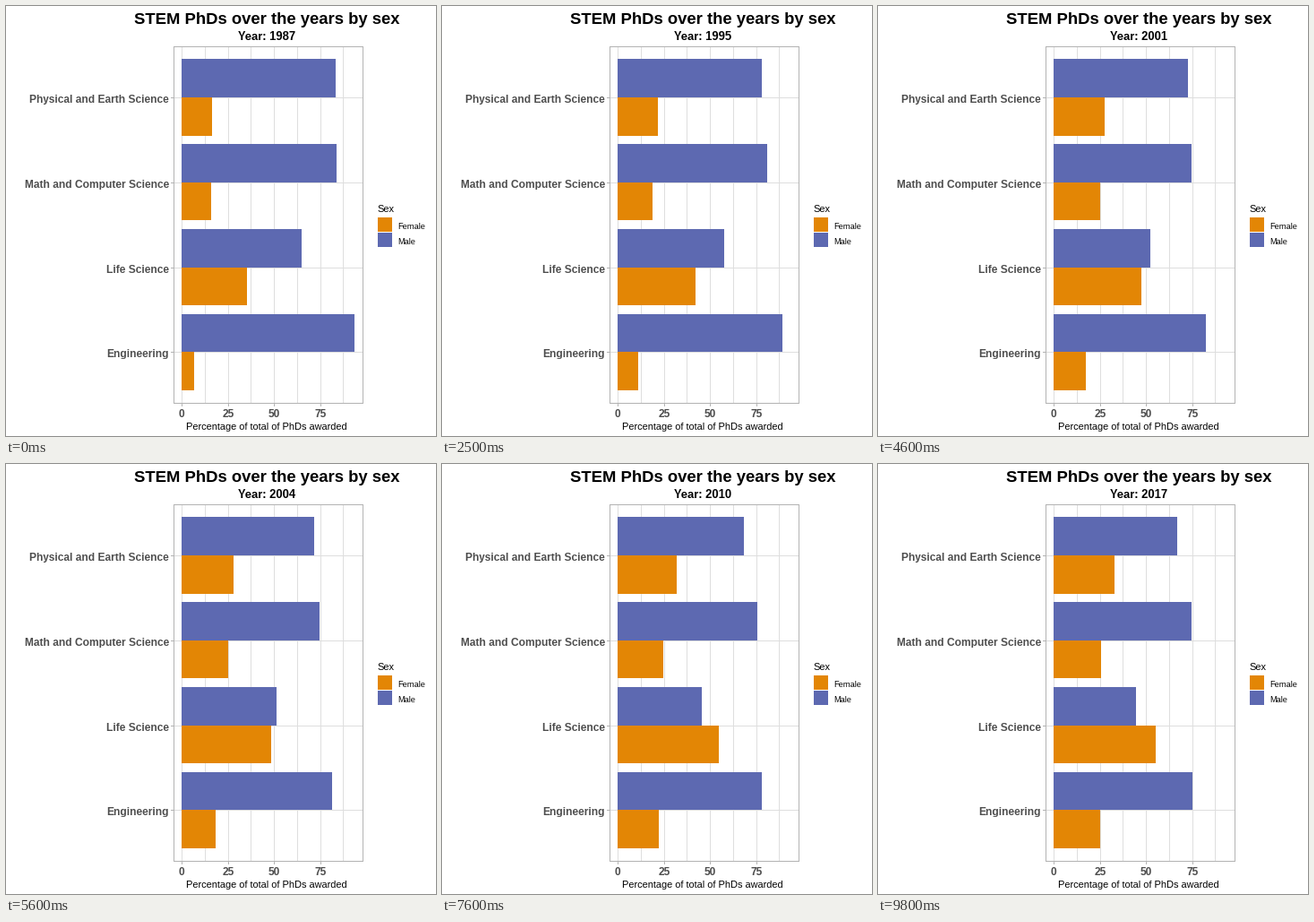
Animation of 480 by 480 pixels, one loop 10000 ms. Source, as a matplotlib script:

```python
import math

import matplotlib.pyplot as plt
from matplotlib.animation import FuncAnimation
from matplotlib.patches import Rectangle

SIZE, DPI = 480, 80
FRAMES, INTERVAL = 100, 100
FIRST, LAST, STEP = 1987, 2017, 5

ORANGE, BLUE = "#E38605", "#5D69B1"
GRID, BORDER, LABEL = "#DEDEDE", "#B3B3B3", "#4D4D4D"

# Share of PhDs awarded to women, every five years
FEMALE = {
    "Physical and Earth Science": [16.49, 21.01, 22.6, 27.56, 30.44, 32.2, 33.0],
    "Math and Computer Science": [16.06, 17.37, 20.3, 25.39, 24.3, 24.61, 25.5],
    "Life Science": [35.2, 39.83, 44.24, 47.7, 51.6, 55.6, 55.3],
    "Engineering": [6.6, 9.45, 12.33, 17.652, 20.775, 22.46, 25.03],
}

ZERO, SCALE = 196.1, 2.0615
LEFT, RIGHT, TOP, BOTTOM = 187, 398, 45, 443
ROW0, ROW_STEP, BAR = 101.9, 94.8, 42.7

plt.rcParams["font.family"] = "Liberation Sans"
plt.rcParams["text.hinting"] = "native"
fig = plt.figure(figsize=(SIZE / DPI, SIZE / DPI), dpi=DPI, facecolor="white")
ax = fig.add_axes([0, 0, 1, 1])
ax.set_xlim(0, SIZE)
ax.set_ylim(SIZE, 0)
ax.axis("off")


def px(v):
    return math.floor(v + 0.5)


def to_x(percent):
    return px(ZERO + SCALE * percent)


def box(x0, y0, x1, y1, color, z=1):
    rect = Rectangle((x0, y0), x1 - x0, y1 - y0, facecolor=color,
                     linewidth=0, antialiased=False, zorder=z)
    return ax.add_patch(rect)


def text(x, y, s, size, ha="center", bold=False, color="black"):
    return ax.text(x, y, s, fontsize=size * 72 / DPI, ha=ha, va="baseline",
                   weight="bold" if bold else "normal", color=color)


def ease(p):
    return 4 * p ** 3 if p < 0.5 else 1 - 4 * (1 - p) ** 3


def share(values, years):
    k = min(int(years / STEP), len(values) - 2)
    p = ease(years / STEP - k)
    return values[k] + (values[k + 1] - values[k]) * p


# Vertical grid and x axis
for i in range(8):
    x = to_x(12.5 * i)
    box(x, TOP, x + 1, BOTTOM, GRID)
    if i % 2 == 0:
        box(x, BOTTOM, x + 1, BOTTOM + 4, BORDER)
        text(x - 0.2, 459, str(25 * i // 2), 12, bold=True, color=LABEL)

# Rows: grid line, tick, label and a pair of bars
bars = []
for i, (name, values) in enumerate(FEMALE.items()):
    c = ROW0 + ROW_STEP * i
    top, mid, low = px(c - BAR), px(c), px(c + BAR)
    box(LEFT, mid, RIGHT, mid + 1, GRID)
    box(LEFT - 3, mid, LEFT, mid + 1, BORDER)
    text(182, mid + 6, name, 12, ha="right", bold=True, color=LABEL)
    male = box(px(ZERO), top, px(ZERO), mid, BLUE, 2)
    female = box(px(ZERO), mid, px(ZERO), low, ORANGE, 2)
    bars.append((values, female, male))

# Panel border
box(LEFT, TOP, RIGHT + 1, TOP + 1, BORDER, 3)
box(LEFT, BOTTOM, RIGHT + 1, BOTTOM + 1, BORDER, 3)
box(LEFT, TOP, LEFT + 1, BOTTOM + 1, BORDER, 3)
box(RIGHT, TOP, RIGHT + 1, BOTTOM + 1, BORDER, 3)

# Titles and legend
text(291.2, 20, "STEM PhDs over the years by sex", 18.5, bold=True)
year_text = text(291, 38, "", 13, bold=True)
text(291.2, 473, "Percentage of total of PhDs awarded", 11)
text(414.5, 230, "Sex", 11, ha="left")
for name, color, y in (("Female", ORANGE, 236), ("Male", BLUE, 253)):
    box(415, y, 431, y + 16, color)
    text(437.5, y + 13, name, 9.3, ha="left")


def draw(i):
    years = (LAST - FIRST) * i / (FRAMES - 1)
    year_text.set_text(f"Year: {FIRST + px(years)}")
    for values, female, male in bars:
        f = share(values, years)
        female.set_width(to_x(f) - px(ZERO))
        male.set_width(to_x(100 - f) - px(ZERO))
    return [year_text]


anim = FuncAnimation(fig, draw, frames=FRAMES, interval=INTERVAL,
                     repeat=True, repeat_delay=0, blit=False)
plt.show()
```
